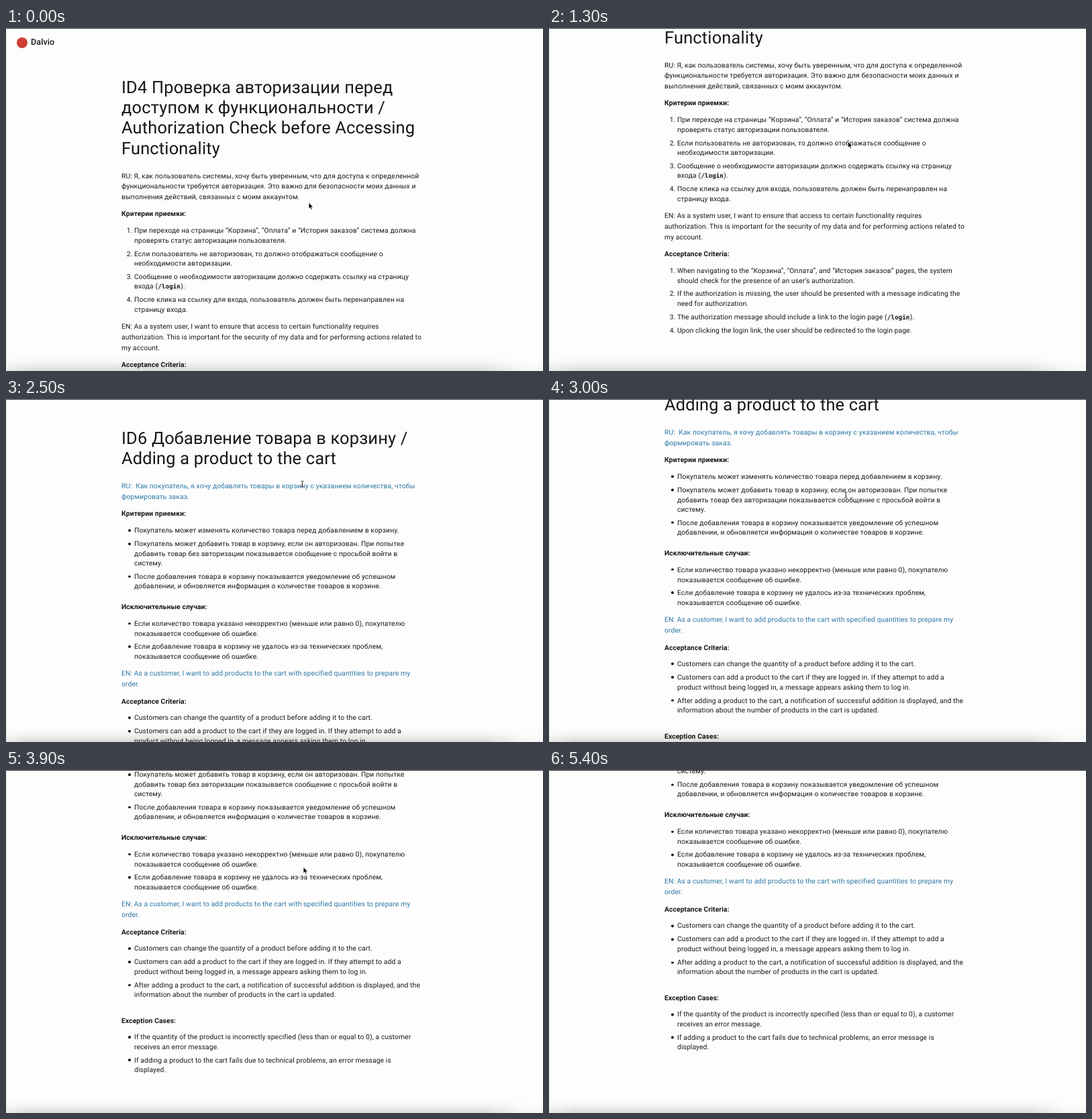
An HTML page for the animation above (5500 ms loop, 800 by 511 pixels).

```html
<!DOCTYPE html>
<html lang="ru">
<head>
<meta charset="utf-8">
<title>Acceptance criteria</title>
<style>
  html, body { margin: 0; width: 100%; height: 100%; overflow: hidden; background: #fdfdfd; }
  #stage {
    position: relative; width: 800px; height: 511px; overflow: hidden;
    color: #171717; font: 10.31px/15.7px Roboto, sans-serif; letter-spacing: .0107em;
    white-space: nowrap; text-rendering: geometricPrecision;
  }
  .page { position: absolute; left: 172px; top: 74.1px; }
  .brand { position: absolute; left: -135px; top: -60px; font-size: 12.5px; font-weight: 500; }
  .brand::before {
    content: ""; position: absolute; left: -21px; top: 0;
    width: 16px; height: 16px; border-radius: 50%; background: #cf3f38;
  }
  h1 { margin: 0 0 17.8px; font-size: 25.4px; font-weight: 400; line-height: 30.15px; letter-spacing: .00735em; }
  h2 { margin: 9.8px 0 0; font-size: inherit; font-weight: 700; }
  p { margin: 0; }
  ol, ul { margin: 10.15px 0 0; padding: 0 0 0 19px; list-style: none; line-height: 14.45px; counter-reset: item; }
  ol + p, ul + p { margin-top: 10.1px; }
  li { position: relative; }
  li + li { margin-top: 5.45px; }
  ol > li::before { counter-increment: item; content: counter(item) "."; position: absolute; right: calc(100% + 2.6px); }
  ul > li::before {
    content: ""; position: absolute; left: -8.8px; top: 4.8px;
    width: 3.6px; height: 3.6px; border-radius: 50%; background: currentColor;
  }
  code { padding: 0 .5px; background: #efefef; font: bold 9px/0 "DejaVu Sans Mono", monospace; }
  .story { color: #2b76a5; }
  .frame { position: absolute; inset: 0; border-top: 1px solid #333; border-left: 1px solid #e2e2e2; }
  .shade {
    position: absolute; left: 0; right: 0; bottom: 0; height: 22px;
    background: linear-gradient(#0000, #00000008 45%, #00000024);
    -webkit-mask: linear-gradient(90deg, #0008, #000 40px 710px, #0003 775px);
    mask: linear-gradient(90deg, #0008, #000 40px 710px, #0003 775px);
  }
  #cursor { position: absolute; left: 0; top: 0; overflow: visible; }
</style>
</head>
<body>
<div id="stage">
  <div class="page">
    <div class="brand">Dalvio</div>
    <h1>ID4 Проверка авторизации перед<br>доступом к функциональности /<br>Authorization Check before Accessing<br>Functionality</h1>
    <p>RU: Я, как пользователь системы, хочу быть уверенным, что для доступа к определенной<br>функциональности требуется авторизация. Это важно для безопасности моих данных и<br>выполнения действий, связанных с моим аккаунтом.</p>
    <h2>Критерии приемки:</h2>
    <ol>
      <li>При переходе на страницы “Корзина”, “Оплата” и “История заказов” система должна<br>проверять статус авторизации пользователя.</li>
      <li>Если пользователь не авторизован, то должно отображаться сообщение о<br>необходимости авторизации.</li>
      <li>Сообщение о необходимости авторизации должно содержать ссылку на страницу<br>входа (<code>/login</code>).</li>
      <li>После клика на ссылку для входа, пользователь должен быть перенаправлен на<br>страницу входа.</li>
    </ol>
    <p>EN: As a system user, I want to ensure that access to certain functionality requires<br>authorization. This is important for the security of my data and for performing actions related to<br>my account.</p>
    <h2>Acceptance Criteria:</h2>
    <ol>
      <li>When navigating to the “Корзина”, “Оплата”, and “История заказов” pages, the system<br>should check for the presence of an user’s authorization.</li>
      <li>If the authorization is missing, the user should be presented with a message indicating the<br>need for authorization.</li>
      <li>The authorization message should include a link to the login page (<code>/login</code>).</li>
      <li>Upon clicking the login link, the user should be redirected to the login page.</li>
    </ol>
  </div>

  <div class="page">
    <div class="brand">Dalvio</div>
    <h1>ID6 Добавление товара в корзину /<br>Adding a product to the cart</h1>
    <p class="story">RU:&nbsp; Как покупатель, я хочу добавлять товары в корзину с указанием количества, чтобы<br>формировать заказ.</p>
    <h2>Критерии приемки:</h2>
    <ul>
      <li>Покупатель может изменять количество товара перед добавлением в корзину.</li>
      <li>Покупатель может добавить товар в корзину, если он авторизован. При попытке<br>добавить товар без авторизации показывается сообщение с просьбой войти в<br>систему.</li>
      <li>После добавления товара в корзину показывается уведомление об успешном<br>добавлении, и обновляется информация о количестве товаров в корзине.</li>
    </ul>
    <h2 style="margin-top:15.4px">Исключительные случаи:</h2>
    <ul>
      <li>Если количество товара указано некорректно (меньше или равно 0), покупателю<br>показывается сообщение об ошибке.</li>
      <li>Если добавление товара в корзину не удалось из-за технических проблем,<br>показывается сообщение об ошибке.</li>
    </ul>
    <p class="story">EN: As a customer, I want to add products to the cart with specified quantities to prepare my<br>order.</p>
    <h2>Acceptance Criteria:</h2>
    <ul>
      <li>Customers can change the quantity of a product before adding it to the cart.</li>
      <li>Customers can add a product to the cart if they are logged in. If they attempt to add a<br>product without being logged in, a message appears asking them to log in.</li>
      <li>After adding a product to the cart, a notification of successful addition is displayed, and the<br>information about the number of products in the cart is updated.</li>
    </ul>
    <h2 style="margin-top:22.9px">Exception Cases:</h2>
    <ul>
      <li>If the quantity of the product is incorrectly specified (less than or equal to 0), a customer<br>receives an error message.</li>
      <li>If adding a product to the cart fails due to technical problems, an error message is<br>displayed.</li>
    </ul>
  </div>

  <div class="shade"></div>
  <div class="frame"></div>
  <svg id="cursor" width="1" height="1">
    <path id="arrow" d="M0 0V9.4L2.1 7.5L3.6 10.8L5.2 10.1L3.8 6.9H6.7Z" fill="#000" stroke="#fff" stroke-width=".8"/>
    <path id="beam" d="M-2-4.5Q0-4.5 0-3Q0-4.5 2-4.5M0-3V3M-2 4.5Q0 4.5 0 3Q0 4.5 2 4.5M-1 1.5H1" fill="none" stroke="#222" stroke-width=".9"/>
  </svg>
</div>
<script>
const LOOP = 5500, STEP = 100, SWITCH = 1900;
const pages = document.querySelectorAll('.page');
const cursor = document.getElementById('cursor');
const arrow = document.getElementById('arrow');
const beam = document.getElementById('beam');

// Keys are [time, value, ...]
const scrolls = [
  [[0, 0], [100, 4], [200, 16], [600, 92], [700, 104.5], [1200, 146], [1400, 184], [1600, 201]],
  [[2200, 0], [2400, 14], [3000, 110.5], [3900, 239], [4100, 261], [4300, 272.6]]
];
const pointer = [
  [0, 451, 260], [700, 448.5, 241], [1200, 447, 232], [1600, 440, -20], [1900, 440, -20],
  [2300, 441, 120], [3000, 442.3, 143.3], [3900, 443, 144.5], [4300, 449.5, 103.5], [4800, 470, -20]
];
const overText = [[400, 1200], [2400, 3600]];

function at(keys, t, column = 1) {
  const next = keys.findIndex(key => key[0] > t);
  if (next === 0) return keys[0][column];
  if (next < 0) return keys[keys.length - 1][column];
  const a = keys[next - 1], b = keys[next];
  return a[column] + (b[column] - a[column]) * (t - a[0]) / (b[0] - a[0]);
}

const show = (element, visible) => { element.style.visibility = visible ? 'visible' : 'hidden'; };

function draw(now) {
  const t = Math.floor(now % LOOP / STEP) * STEP;
  const current = t < SWITCH ? 0 : 1;
  pages.forEach((page, i) => {
    show(page, i === current);
    page.style.transform = `translateY(${-at(scrolls[i], t)}px)`;
  });
  cursor.style.transform = `translate(${at(pointer, t)}px, ${at(pointer, t, 2)}px)`;
  const text = overText.some(([from, to]) => t >= from && t < to);
  show(beam, text);
  show(arrow, !text);
}

let start;
function tick(now) {
  start ??= now;
  draw(now - start);
  requestAnimationFrame(tick);
}
draw(0);
requestAnimationFrame(tick);
</script>
</body>
</html>
```
